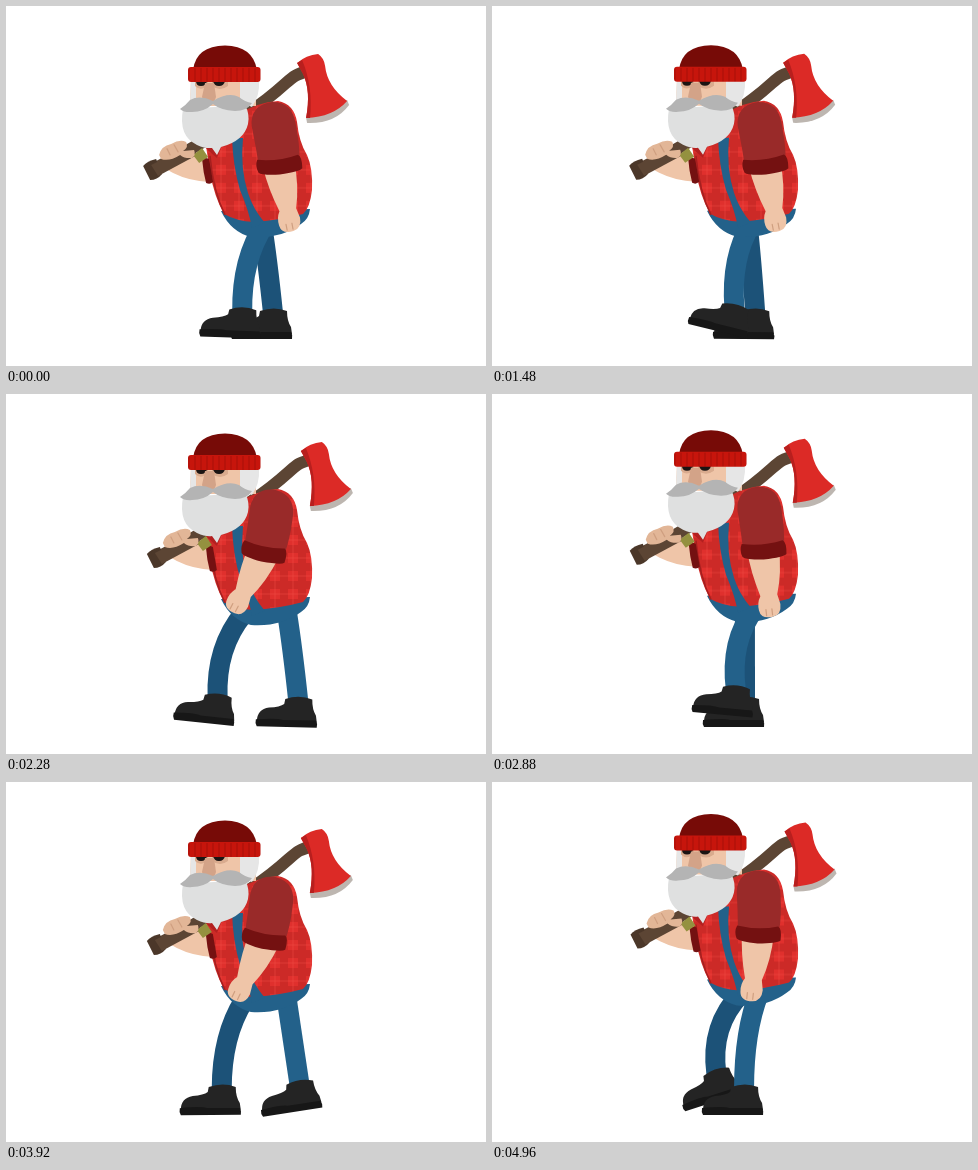
Write an HTML page that moves like this. It is 480 px wide and 360 px high and loops after 5000 ms.

```html
<!DOCTYPE html>
<html lang="en">
<head>
<meta charset="utf-8">
<title>Walking lumberjack</title>
<style>
  html, body { margin: 0; width: 100%; height: 100%; overflow: hidden; background: #fff; }
  svg { display: block; width: 100vw; height: 100vh; }
  .skin { fill: #efc5a8; }
  .cuff { fill: #741111; }
  .leg { fill: none; stroke-width: 20; stroke-linejoin: round; }
  .line { fill: none; stroke: #cf9f80; stroke-width: 1.2; stroke-linecap: round; }
</style>
</head>
<body>
<svg viewBox="0 0 480 360">
  <defs>
    <pattern id="plaid" width="18" height="18" x="4" y="7" patternUnits="userSpaceOnUse">
      <path fill="#e0302d" d="M0 0h18v18H0z"/>
      <path fill="#a01c1c" fill-opacity=".3" d="M0 0h8v18H0zM0 0h18v8H0z"/>
      <path stroke="#f04a42" stroke-opacity=".5" d="M13 0v18M0 13h18"/>
    </pattern>
    <pattern id="ribs" width="6" height="16" x="2" y="61" patternUnits="userSpaceOnUse">
      <path fill="#c7150c" d="M0 0h6v16H0z"/>
      <path stroke="#a80f08" d="M1 1v14"/>
    </pattern>
    <g id="shoe">
      <path fill="#242424" d="M-30-5Q-30-17-18-19Q-7-20-3-23L-2-28Q12-33 25-28Q25-18 29-12L30-5Z"/>
      <path fill="#171717" d="M-31-7Q-10-9-4-7H29Q31-4 30 0H-30Q-32-3-31-7Z"/>
    </g>
  </defs>

  <path id="farLeg" class="leg" stroke="#1c5278"/>
  <use id="farShoe" href="#shoe"/>
  <path id="nearLeg" class="leg" stroke="#23618a"/>
  <use id="nearShoe" href="#shoe"/>

  <g id="body">
    <g id="axe">
      <path fill="none" stroke="#5c4534" stroke-width="12" d="M149 163C190 142 235 114 262 93S284 70 304 65"/>
      <path fill="#4b3729" d="M138 160Q142 155 151 153L157 168Q152 174 145 174Z"/>
      <path fill="#bdb6b0" d="M301 112L302 117Q330 118 344 99L342 94Z"/>
      <path fill="#dc2a26" d="M292 57Q301 49 313 48Q319 52 320 60Q322 80 342 95Q328 111 301 112Q306 85 298 68Z"/>
      <path fill="#b81f1e" d="M292 57L297 54Q308 80 305 112H301Q306 85 298 68Z"/>
    </g>

    <path fill="#23618a" d="M215 205Q225 226 245 231Q275 233 295 218Q303 213 304 203Z"/>
    <path fill="url(#plaid)" d="M200 140Q230 98 272 95Q288 98 291 116Q293 136 301 149Q307 162 306 184Q304 202 297 208Q275 214 248 216Q230 215 218 208Q208 190 204 166Z"/>
    <path fill="none" stroke="#a51f1f" stroke-width="1.5" d="M204 150Q207 185 219 209"/>
    <path fill="#23618a" d="M226 132H237Q234 162 242 187Q247 203 259 217L246 222Q243 205 234 184Q227 160 226 132Z"/>
    <path fill="#b32020" d="M198 140L217 137L211 152L204 146Z"/>

    <g id="grip">
      <path class="skin" d="M156 155Q170 148 200 150L204 176Q184 175 168 167Q157 162 156 155Z"/>
      <path class="cuff" d="M197 153Q200 151 204 153L208 176Q205 179 201 177Q198 166 197 153Z"/>
      <path fill="#5c4534" d="M146 159L186 139L192 149L153 170Z"/>
      <path fill="#94913f" d="M188 149L197 142L203 151L194 157Z"/>
      <path fill="#e2b697" d="M154 149Q156 140 166 138Q175 133 181 136Q184 141 178 145L189 144Q191 149 187 152Q180 153 175 149Q164 156 156 153Z"/>
      <path class="line" d="M162 143l3 6M169 139l4 7"/>
    </g>

    <g id="head">
      <path class="skin" d="M185 72H250V100H184Z"/>
      <path fill="#e6e6e6" d="M234 74H253Q254 90 246 101L234 96ZM185 74H190V92L184 96Z"/>
      <path fill="#d9ab8e" d="M189 75H202V79Q195 86 189 80ZM206 75H222V80Q214 86 206 80Z"/>
      <path fill="#1b1413" d="M190 75H201Q200 80 195 80T190 75ZM207 75H219Q218 80 213 80T207 75Z"/>
      <path fill="#dfe0e0" d="M177 103Q172 130 191 139Q200 143 206 142L211 149L215 141Q238 135 242 118Q244 108 239 99Z"/>
      <path fill="#d3a388" d="M199 77H208L210 91Q208 98 203 98T196 91Z"/>
      <path fill="#b4b4b4" d="M174 103Q180 99 184 94Q194 89 207 95Q222 86 233 91Q239 96 246 97Q241 105 229 105Q214 104 207 98Q198 106 186 106Q179 107 174 103Z"/>
      <path fill="#770b07" d="M187 64Q190 40 219 39.500Q247 40 251 64Z"/>
      <rect x="182" y="61" width="72.500" height="15" rx="3" fill="url(#ribs)"/>
    </g>

    <g id="upperArm">
      <g id="foreArm">
        <path class="skin" d="M252 158H284Q284 184 277 205L279 215Q279 226 270 227Q258 228 257 219Q256 211 260 205Q253 180 252 158Z"/>
        <path class="line" d="M264 219v6M270 219v6"/>
      </g>
      <path fill="#992a29" d="M245 118Q245 98 266 96Q288 97 289 121Q291 140 289 157H248Q247 138 245 118Z"/>
      <path class="cuff" d="M247 152Q268 156 288 151Q292 153 291 165Q288 168 268 169Q250 168 247 165Q244 158 247 152Z"/>
    </g>
  </g>
</svg>
<script>
const LOOP = 5000, STEP = 40, CYCLE = 1545, GROUND = 333;
const TAU = Math.PI * 2;
const $ = id => document.getElementById(id);
const place = (id, value) => $(id).setAttribute('transform', value);

// phase since contact, near foot x, far foot x, lift, tilt
const STRIDE = [
  [.03, 224, 204, 0, 0],
  [.1, 229, 212, 0, 0],
  [.21, 241, 225, 0, 0],
  [.28, 251, 233, 0, 0],
  [.44, 274.5, 250, 0, 0],
  [.5, 284, 256, 0, 0],
  [.58, 287, 258, 7, -20],
  [.64, 278, 242, 11, -24],
  [.71, 260, 222, 13, -18],
  [.79, 240, 212, 13, -8],
  [.88, 229, 204, 12, 8],
  [.945, 226, 199.5, 10, 17],
  [.98, 225, 198, 3.5, 5]
];

function key(i) {
  const n = STRIDE.length, turn = Math.floor(i / n);
  const row = STRIDE[i - turn * n];
  return [row[0] + turn, ...row.slice(1)];
}

// Periodic cubic interpolation of one column
function sample(phase, col) {
  let u = phase - Math.floor(phase);
  if (u < STRIDE[0][0]) u += 1;
  let i = 0;
  while (key(i + 1)[0] <= u) i++;
  const [a, b, c, d] = [-1, 0, 1, 2].map(k => key(i + k));
  const h = c[0] - b[0], s = (u - b[0]) / h;
  const m0 = (c[col] - a[col]) / (c[0] - a[0]) * h;
  const m1 = (d[col] - b[col]) / (d[0] - b[0]) * h;
  const s2 = s * s, s3 = s2 * s;
  return (2 * s3 - 3 * s2 + 1) * b[col] + (s3 - 2 * s2 + s) * m0
    + (3 * s2 - 2 * s3) * c[col] + (s3 - s2) * m1;
}

function drawLeg(name, phase, col, hipX, hipY) {
  const x = sample(phase, col);
  const lift = Math.max(0, sample(phase, 3));
  const tilt = sample(phase, 4);
  const y = GROUND - lift, r = tilt * TAU / 360;
  const ax = x + 11 * Math.cos(r) + 26 * Math.sin(r);
  const ay = y + 11 * Math.sin(r) - 26 * Math.cos(r);
  const kx = Math.min(ax, (hipX + ax) / 2) - lift * .5;
  const ky = hipY + (ay - hipY) * .4;
  place(name + 'Shoe', `translate(${x} ${y}) rotate(${tilt})`);
  $(name + 'Leg').setAttribute('d', `M${hipX} ${hipY}Q${kx} ${ky} ${ax} ${ay}`);
}

function draw(time) {
  const p = time / CYCLE;
  const swing = Math.cos(TAU * p);
  const arm = Math.cos(TAU * (p + .025));
  const bob = 3.8 * (Math.cos(2 * TAU * (p + .02)) - 1);
  const sway = `translate(${1 - 1.9 * swing - .0} 0)`;

  place('body', `translate(0 ${bob})`);
  place('axe', sway);
  place('grip', sway);
  place('upperArm', `rotate(${3.5 - 9.5 * arm} 268 112)`);
  place('foreArm', `rotate(${4.5 - 9.5 * arm} 268 160)`);
  drawLeg('far', p - .5, 2, 247 + 9 * swing, 219 + bob);
  drawLeg('near', p, 1, 270 - 11 * swing, 218 + bob);
}

function tick() {
  const t = performance.now() % LOOP;
  draw(Math.floor(t / STEP) * STEP);
  requestAnimationFrame(tick);
}
tick();
</script>
</body>
</html>
```
